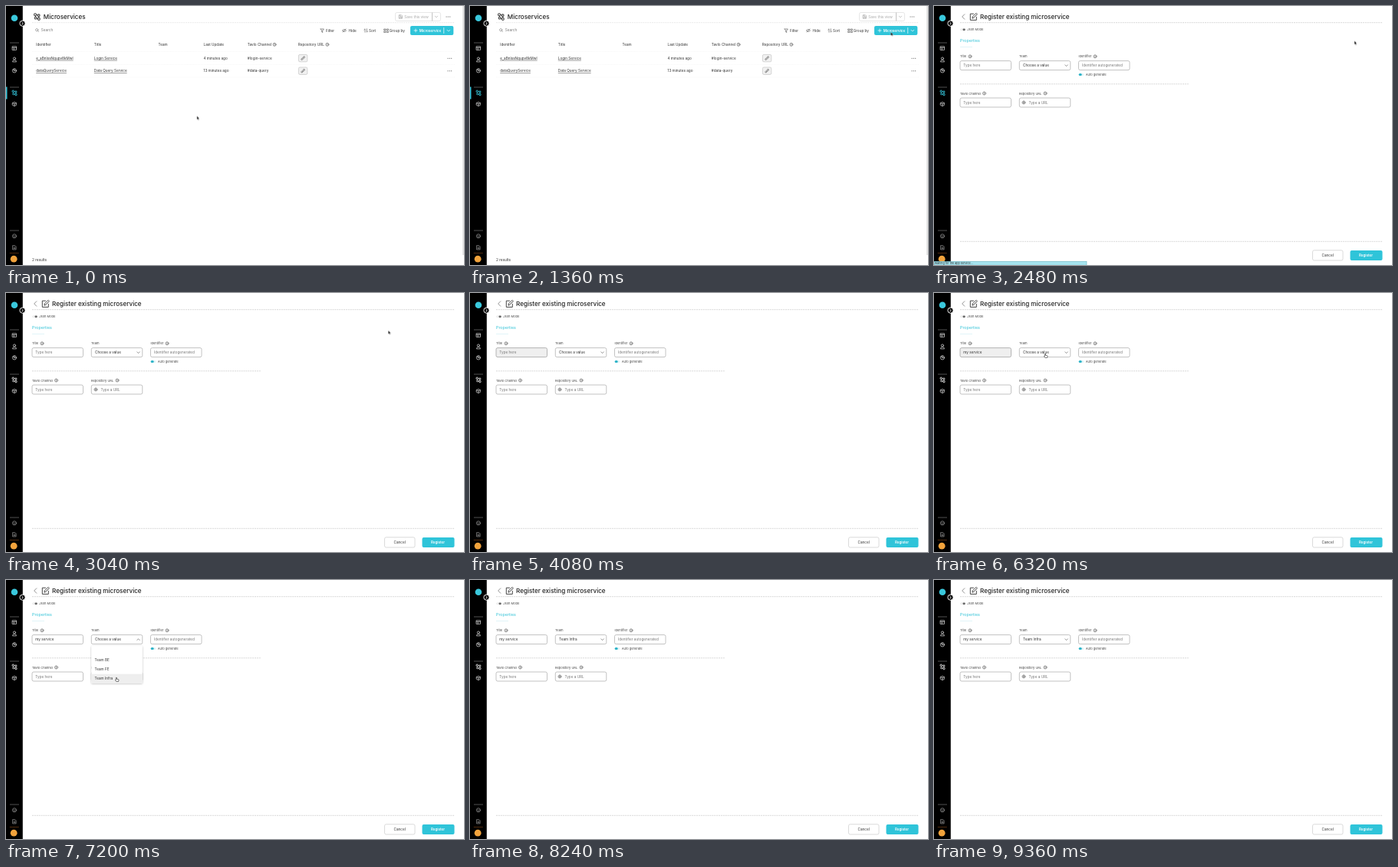
Write an HTML page that moves like this. It is 597 px wide and 338 px high and loops after 9440 ms.

```html
<!DOCTYPE html>
<html lang="en">
<head>
<meta charset="utf-8">
<title>Register a microservice</title>
<style>
html, body { margin: 0; width: 100%; height: 100%; overflow: hidden; background: #fff; }
svg { display: block; width: 597px; height: 338px; }
text { font: 4.68px Inter, "Open Sans", sans-serif; fill: #333; white-space: pre; }
.heading { font-size: 8.1px; font-weight: 500; fill: #222; }
.label text { font-size: 4px; fill: #444; }
.muted { fill: #777; }
.pale { fill: #aaa; }
.cyan { fill: #2fc2d6; }
.on-button { fill: #fff; font-weight: 600; font-size: 4.5px; }
.link { text-decoration: underline; text-decoration-thickness: .35px; text-underline-offset: 1px; }
.line { fill: none; stroke: #666; stroke-width: .7; stroke-linecap: round; stroke-linejoin: round; }
.white { stroke: #ddd; }
.dash { stroke: #c8c8c8; stroke-width: .7; stroke-dasharray: 2 .9; }
.faint { stroke: #eee; stroke-width: .5; stroke-dasharray: 1 1; }
.field { fill: #fff; stroke: #aaa; stroke-width: .7; }

/* Hard switches share one 9440 ms clock. */
.anim { animation: 9440ms step-end infinite; }
.table { animation-name: table; }
.form { opacity: 0; animation-name: form; }
.nav-on { animation-name: nav-on; }
.nav-off { opacity: 0; animation-name: nav-off; }
.status { opacity: 0; animation-name: status; }
.focus { animation-name: focus; }
.hint { animation-name: hint; }
.letter { fill-opacity: 0; animation-name: letter; animation-delay: calc(var(--i) * 115ms); }
.caret { opacity: 0; animation-name: caret; }
.menu { opacity: 0; animation-name: menu; }
.hover { opacity: 0; animation-name: hover; }
.before { animation-name: before; }
.after { opacity: 0; animation-name: after; }
.arrow { animation-name: arrow; }
.hand { opacity: 0; animation-name: hand; }
.pointer { animation: pointer 9440ms ease-in-out infinite; }

@keyframes table { 0% { opacity: 1 } 21.19%, to { opacity: 0 } }
@keyframes form { 0% { opacity: 0 } 21.19%, to { opacity: 1 } }
@keyframes nav-on { 0% { opacity: 1 } 31.3%, to { opacity: 0 } }
@keyframes nav-off { 0% { opacity: 0 } 31.3%, to { opacity: 1 } }
@keyframes status { 0% { opacity: 0 } 21.19% { opacity: 1 } 31.3%, to { opacity: 0 } }
@keyframes focus { 0% { fill: #fff; stroke: #aaa } 41.52% { fill: #efefef; stroke: #999 } 67.79%, to { fill: #fff; stroke: #aaa } }
@keyframes hint { 0% { opacity: 1 } 47.45%, to { opacity: 0 } }
@keyframes letter { 0% { fill-opacity: 0 } 47.45%, to { fill-opacity: 1 } }
@keyframes caret {
  0% { opacity: 0; transform: none }
  47.45% { opacity: 1; transform: translateX(4.1px) }
  48.67% { opacity: 1; transform: translateX(6.7px) }
  49.89% { opacity: 1; transform: translateX(8px) }
  51.11% { opacity: 1; transform: translateX(10.6px) }
  52.33% { opacity: 1; transform: translateX(13.3px) }
  53.55% { opacity: 1; transform: translateX(15.1px) }
  54.77% { opacity: 1; transform: translateX(17.7px) }
  55.98% { opacity: 1; transform: translateX(18.9px) }
  57.2% { opacity: 1; transform: translateX(21.6px) }
  58.42% { opacity: 1; transform: translateX(24.3px) }
  61.01%, to { opacity: 0; transform: none }
}
@keyframes menu { 0% { opacity: 0 } 67.79% { opacity: 1 } 80.5%, to { opacity: 0 } }
@keyframes hover {
  0% { opacity: 0; transform: none }
  69.5% { opacity: 1; transform: none }
  70.7% { opacity: 1; transform: translateY(12px) }
  72% { opacity: 1; transform: translateY(24px) }
  73.2%, to { opacity: 1; transform: translateY(36px) }
}
@keyframes before { 0% { opacity: 1 } 80.5%, to { opacity: 0 } }
@keyframes after { 0% { opacity: 0 } 80.5%, to { opacity: 1 } }
@keyframes arrow { 0% { opacity: 1 } 37.4% { opacity: 0 } 62.71% { opacity: 1 } 65.68%, to { opacity: 0 } }
@keyframes hand { 0% { opacity: 0 } 65.68% { opacity: 1 } 80.5%, to { opacity: 0 } }
@keyframes pointer {
  0%, .85% { transform: translate(248.8px, 143.5px) }
  5.93%, 22% { transform: translate(548.5px, 34px) }
  25.4%, 30.5% { transform: translate(548px, 45.5px) }
  38.14%, 62.71% { transform: translate(67px, 78px) }
  66.95%, 68.64% { transform: translate(145px, 79px) }
  73.73%, to { transform: translate(144px, 127px) }
}
</style>
</head>
<body>
<svg viewBox="0 0 597 338" xmlns="http://www.w3.org/2000/svg">
  <defs>
    <g id="info" class="line"><circle r="2"/><path d="M0-.1V.9M0-1v.1"/></g>
    <path id="dots" d="M0 0h.1M2.3 0h.1M4.6 0h.1" fill="none" stroke="#555" stroke-width="1.1" stroke-linecap="round"/>
    <path id="down" class="line" d="M-1.7-.8 0 .9 1.7-.8"/>
    <rect id="box" width="66.5" height="12" rx="2"/>
    <g id="url">
      <rect x=".4" y=".4" width="11.4" height="9.4" rx="1.6" fill="#f1f1f1" stroke="#c4c4c4" stroke-width=".7"/>
      <path class="line" stroke="#999" d="M5.2 6.3 7.1 4M5.7 4.2 7 2.9q1.5-.5 1.5 1L7.3 5.4M6.4 6 5.2 7.3q-1.5.5-1.5-1L4.9 5"/>
    </g>
    <g id="nodes" fill="none" stroke="currentColor" stroke-width=".9">
      <circle cx="-1.8" cy="-2.2" r="1.2"/><circle cx="1.9" cy="-1.4" r="1.1"/><circle cx="-1.3" cy="1.3" r="1.1"/><circle cx="2" cy="2.3" r="1.2"/>
      <path d="M-.7-2 .8-1.6M-1.6-1-1.4.2M-.2 1.6.9 2M1.9-.3V1.1"/>
    </g>
    <filter id="shadow"><feDropShadow dx="0" dy=".8" stdDeviation="1" flood-opacity=".3"/></filter>
  </defs>

  <rect width="597" height="338" fill="#fff"/>

  <g class="anim table">
    <g transform="translate(40.3 14) scale(1.25)" color="#444"><use href="#nodes"/></g>
    <text class="heading" x="48.8" y="17">Microservices</text>
    <path class="dash" d="M34 21.7H585" opacity=".55"/>

    <rect x="507.5" y="8.5" width="59" height="11" rx="2" fill="#fff" stroke="#ddd" stroke-width=".7"/>
    <path class="line" style="stroke:#aaa" d="M512.5 11.8h3l1 1v3.4h-4zM513.5 12v1.3h1.6M513.5 16v-1.5h2V16M555.5 9v10"/>
    <text class="pale" x="519.3" y="15.7">Save this view</text>
    <use href="#down" x="561" y="14" opacity=".5"/>
    <use href="#dots" x="574" y="14"/>

    <g class="line" style="stroke:#888"><circle cx="40.2" cy="31.2" r="1.6"/><path d="m41.4 32.4 1.2 1.2"/></g>
    <text class="muted" x="45.8" y="33.4">Search</text>

    <g class="line">
      <path d="M410 30h4.4l-1.7 2.2V34.6l-1-.6v-1.8z"/>
      <path d="M438.5 32q2.5-3 5 0-2.5 3-5 0M439 34l4-4"/>
      <path d="M468 34.2V29.8l-1.2 1.2M470.3 29.8v4.4l1.2-1.2"/>
      <path d="M493 30h2v1.6h-2zM496.5 30h2v1.6h-2zM493 33h2v1.4h-2zM496.5 33h2v1.4h-2z"/>
    </g>
    <text x="417" y="33.8">Filter</text>
    <text x="446.6" y="33.8">Hide</text>
    <text x="473" y="33.8">Sort</text>
    <text x="499.7" y="33.8">Group by</text>

    <rect x="527" y="26" width="56.3" height="12" rx="2" fill="#2fc4d9"/>
    <path class="line" style="stroke:#fff" d="M532 32h4M534 30v4M570.7 28.5v7M575 31.3l1.8 1.8 1.8-1.8"/>
    <text class="on-button" x="538.7" y="33.7">Microservice</text>

    <text x="39.2" y="52">Identifier</text>
    <text x="114.8" y="52">Title</text>
    <text x="198.6" y="52">Team</text>
    <text x="257.5" y="52">Last Update</text>
    <text x="314.8" y="52">Tavlo Channel</text>
    <use href="#info" x="350" y="50.3"/>
    <text x="380.8" y="52">Repository URL</text>
    <use href="#info" x="418.8" y="50.3"/>
    <path class="faint" d="M34 59.5H585M34 76.5H585M34 93H585"/>

    <text class="link" x="39.2" y="69.8">e_aBnIssNqupv8kMwl</text>
    <text class="link" x="114.8" y="69.8">Login Service</text>
    <text x="257.5" y="69.8">4 minutes ago</text>
    <text x="314.8" y="69.8">#login-service</text>
    <use href="#url" x="381" y="63"/>
    <use href="#dots" x="576" y="68.3"/>

    <text class="link" x="39.2" y="86.4">dataQueryService</text>
    <text class="link" x="114.8" y="86.4">Data Query Service</text>
    <text x="257.5" y="86.4">13 minutes ago</text>
    <text x="314.8" y="86.4">#data-query</text>
    <use href="#url" x="381" y="79.6"/>
    <use href="#dots" x="576" y="84.8"/>

    <text x="34" y="332.8">2 results</text>
    <path d="M596 0V325" stroke="#d2d2d2" stroke-width="1.2"/>
  </g>

  <g class="anim form">
    <path class="line" d="M39.8 10.8 36.7 14l3.1 3.2"/>
    <path class="line" style="stroke:#333;stroke-width:.9" d="M51.5 10.2h-4.2v8.2h8V14.3M50 15.8l.5-2L55 9.3l1.4 1.4-4.5 4.5z"/>
    <text class="heading" x="60" y="17">Register existing microservice</text>
    <path class="dash" d="M34 21.7H585M34 101.8H332M34 307.3H585"/>

    <rect x="34" y="29.3" width="7" height="3" rx="1.5" fill="#f0f0f0"/>
    <rect x="37.5" y="29.4" width="3.3" height="2.8" rx="1.4" fill="#666"/>
    <g class="label">
      <text x="43.3" y="32.4">Json Mode</text>
      <text x="34" y="67.3">Title</text>
      <text x="111" y="67.3">Team</text>
      <text x="188.5" y="67.3">Identifier</text>
      <text x="197.8" y="91">Auto generate</text>
      <text x="34" y="115.6">Tavlo Channel</text>
      <text x="111" y="115.6">Repository URL</text>
    </g>
    <text class="cyan" style="font-size:5.3px" x="34" y="47.3">Properties</text>
    <path d="M34 53.5h16" stroke="#cdeff4" stroke-width=".6"/>
    <use href="#info" x="47" y="65.8"/>
    <use href="#info" x="210" y="65.8"/>
    <use href="#info" x="65.5" y="114"/>
    <use href="#info" x="145" y="114"/>

    <use href="#box" x="34" y="71.6" class="field anim focus"/>
    <use href="#box" x="111.3" y="71.6" class="field"/>
    <use href="#box" x="188.5" y="71.6" class="field"/>
    <use href="#box" x="34" y="120" class="field"/>
    <use href="#box" x="111.3" y="120" class="field"/>

    <text class="muted anim hint" x="38.3" y="79.4">Type here</text>
    <text x="38.3" y="79.4"><tspan class="anim letter" style="--i:0">m</tspan><tspan class="anim letter" style="--i:1">y </tspan><tspan class="anim letter" style="--i:3">s</tspan><tspan class="anim letter" style="--i:4">e</tspan><tspan class="anim letter" style="--i:5">r</tspan><tspan class="anim letter" style="--i:6">v</tspan><tspan class="anim letter" style="--i:7">i</tspan><tspan class="anim letter" style="--i:8">c</tspan><tspan class="anim letter" style="--i:9">e</tspan></text>
    <rect class="anim caret" x="38.5" y="75" width=".6" height="5.4" fill="#222"/>

    <text class="anim before" x="116" y="79.4">Choose a value</text>
    <text class="anim after" x="116" y="79.4">Team Infra</text>
    <use href="#down" x="172.5" y="77.7"/>
    <text class="muted" x="193" y="79.4">Identifier autogenerated</text>
    <rect x="188.5" y="88" width="7" height="3" rx="1.5" fill="#e4f6f9"/>
    <rect x="188.7" y="88" width="4" height="3" rx="1.5" fill="#2fb4c8"/>
    <text class="muted" x="38.3" y="127.8">Type here</text>
    <g class="line" style="stroke:#888"><circle cx="117" cy="126" r="2"/><path d="M115 126h4M117 124q-1.7 2 0 4 1.7-2 0-4"/></g>
    <text class="muted" x="123.5" y="127.8">Type a URL</text>

    <rect x="493.5" y="318.8" width="39.5" height="13.2" rx="2" fill="#fff" stroke="#ccc" stroke-width=".7"/>
    <text x="505.6" y="327.1">Cancel</text>
    <rect x="542.5" y="319" width="42" height="13" rx="2" fill="#2fc4d9"/>
    <text class="on-button" x="554" y="327.1">Register</text>

    <g class="anim menu">
      <rect x="170" y="75" width="5" height="5" fill="#fff"/>
      <path class="line" d="M170.8 78.5l1.7-1.7 1.7 1.7"/>
      <rect x="111.3" y="86" width="66.5" height="48.6" rx="1" fill="#fff" filter="url(#shadow)"/>
      <rect class="anim hover" x="111.3" y="86.7" width="66.5" height="11.8" fill="#eee"/>
      <text x="115.5" y="106.2">Team BE</text>
      <text x="115.5" y="118.3">Team FE</text>
      <text x="115.5" y="130.3">Team Infra</text>
    </g>
  </g>

  <rect width="21.8" height="338" fill="#000"/>
  <circle cx="11" cy="15.8" r="4.3" fill="#3ac8dc"/>
  <circle cx="21.5" cy="22.7" r="3.6" fill="#000" stroke="#fff" stroke-width=".9"/>
  <path class="line" style="stroke:#fff;stroke-width:.9" d="M20.8 21.2l1.5 1.5-1.5 1.5"/>
  <path d="M5 48h12M5 106h12M5 293h12" stroke="#888" stroke-width=".6"/>
  <path d="M5 322.4h12" stroke="#a65a20" stroke-width=".7" stroke-dasharray="1.4 .6"/>
  <g class="line white">
    <path d="M8.5 52.8h5v4.6h-5zM8.5 54.4h5M10.3 54.4v3"/>
    <circle cx="11" cy="68.5" r="1.6"/><path d="M8.5 72.5q0-2 2.5-2t2.5 2z"/>
    <circle cx="11" cy="84.4" r="2.6"/><path d="M9.2 83l1.8 1.4h2.2M11 84.4v-2.4"/>
    <path d="M8.6 126.6l2.4-1.2 2.4 1.2v2.8L11 130.6l-2.4-1.2zM8.6 126.6l2.4 1.2 2.4-1.2M11 127.8v2.8"/>
  </g>
  <g class="line" style="stroke:#999">
    <circle cx="11" cy="300.3" r="2.6"/><path d="M9.7 301q1.3 1.2 2.6 0M10 299.5v.1M12 299.5v.1"/>
    <path d="M9 312.6h2.8l1.3 1.3v4H9zM10 315h2M10 316.5h2"/>
  </g>
  <g class="anim nav-on" color="#35c5da"><use href="#nodes" x="11" y="113.4"/></g>
  <g class="anim nav-off" color="#ddd"><use href="#nodes" x="11" y="113.4"/></g>
  <rect class="anim table" y="105.5" width="1.5" height="16" fill="#35c5da"/>
  <circle cx="10.2" cy="330.2" r="4.4" fill="#f2a33c"/>

  <g class="anim status">
    <rect y="333.2" width="199" height="5" fill="#a5e3ee" stroke="#5fa8b5" stroke-width=".5"/>
    <text style="font-size:3.7px" x=".8" y="337.4">Waiting for the app service…</text>
  </g>

  <g class="pointer">
    <path class="anim arrow" d="M0 0V4.8L1.1 3.8 1.9 5.5 2.7 5.1 1.9 3.5H3.4z" fill="#111" stroke="#fff" stroke-width=".35"/>
    <path class="anim hand" d="M-.6 3.4V.5q.6-.9 1.1 0V2.3l2 .4q.7.2.5 1L2.5 5.6H-.2L-1.7 3.5q.3-.9 1.1-.1" fill="#fff" stroke="#222" stroke-width=".6" stroke-linejoin="round"/>
  </g>
</svg>
</body>
</html>
```
